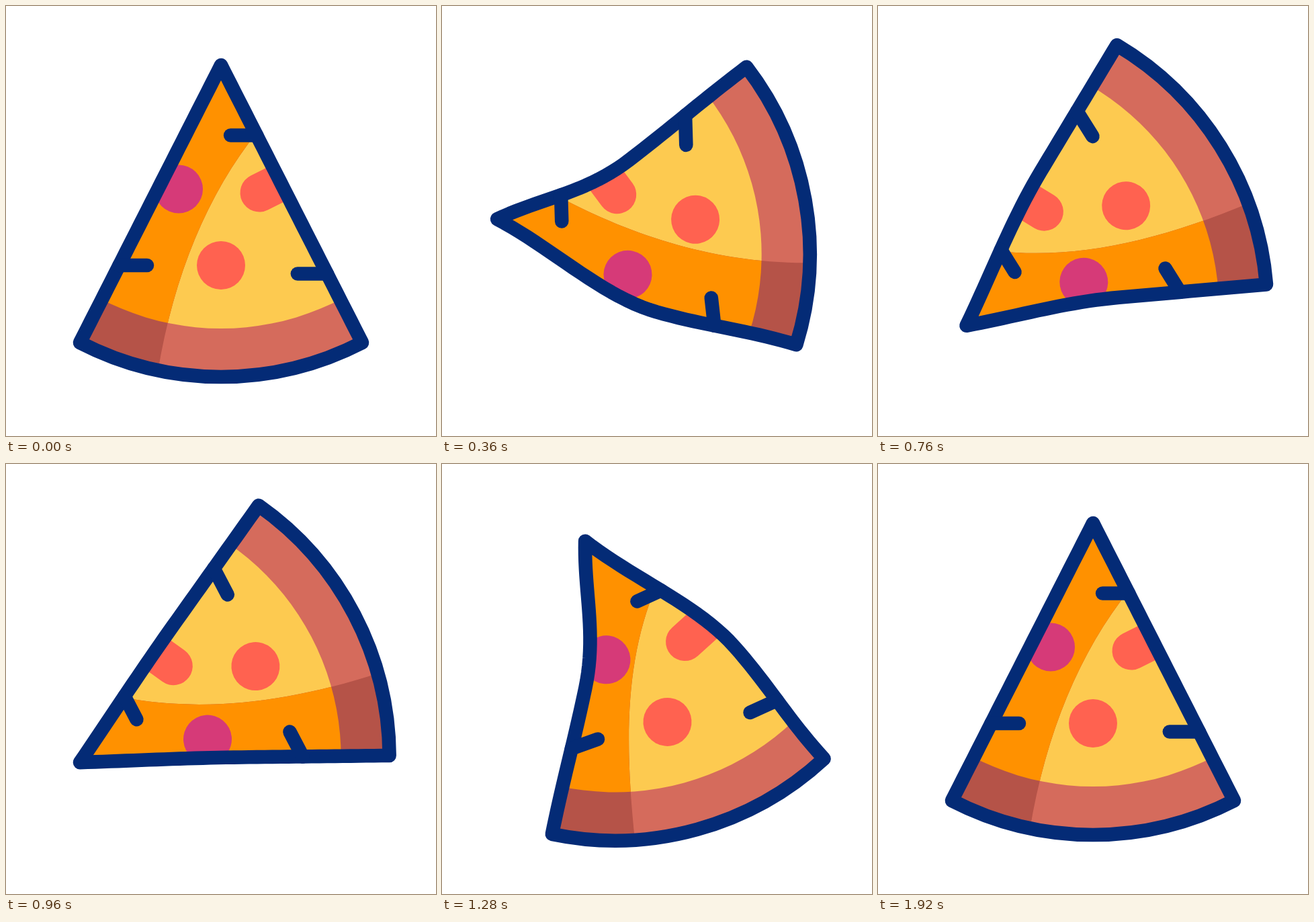
Write an HTML page with a canvas that moves like this. It is 640 by 640 pixels and loops after 2120 ms.

```html
<!DOCTYPE html>
<html>
<head>
<meta charset="utf-8">
<style>
  html, body { margin: 0; width: 100%; height: 100%; overflow: hidden; background: #fff; }
  canvas { display: block; width: 100vw; height: 100vh; }
</style>
</head>
<body>
<canvas id="stage" width="640" height="640"></canvas>
<script>
const ctx = document.getElementById('stage').getContext('2d');
const NAVY = '#042b76', LOOP = 2120, STEP = 40, RETURN = 900, SWING = 122;
const PIVOT = [320, 328], ARC = [320, 94], ARC_R = 458, CRUST_R = 386;
const SLOPE = 210 / 413;

// Smooth curve through [time, value] keys, flat at both ends
function track(keys, t) {
  const last = keys.length - 1;
  if (t <= keys[0][0]) return keys[0][1];
  if (t >= keys[last][0]) return keys[last][1];
  const i = keys.findIndex(k => k[0] > t) - 1;
  const slope = j => j <= 0 || j >= last ? 0
    : (keys[j + 1][1] - keys[j - 1][1]) / (keys[j + 1][0] - keys[j - 1][0]);
  const [t0, a] = keys[i], [t1, b] = keys[i + 1], w = t1 - t0, s = (t - t0) / w;
  const e = s * s * (3 - 2 * s);
  return a + (b - a) * e + w * s * (1 - s) * ((1 - s) * slope(i) - s * slope(i + 1));
}

const turnKeys = [[0, 0], [60, .036], [240, .393], [380, .873], [520, 1]];
const bulgeKeys = [[240, 0], [380, 1], [520, 0]];
const tipKeys = end => [[0, 0], [60, 5.6], [240, 68], [380, 46], [560, -42], [700, -38], [end, 0]];

function pose(t) {
  const dir = t < RETURN ? 1 : -1;
  const u = dir > 0 ? t : t - RETURN;
  const turn = track(turnKeys, u);
  return {
    dir,
    angle: -SWING * (dir > 0 ? turn : 1 - turn) * Math.PI / 180,
    tip: dir * track(tipKeys(dir > 0 ? 890 : 1010), u),
    bulge: track(bulgeKeys, u)
  };
}

// Point on a flank: the tip lags behind, the middle bulges
function edge(p, side, y) {
  const h = Math.max(0, (304 - y) / 216), g = h * h * (2 - h);
  const b = p.bulge * Math.sin(Math.PI * (501 - y) / 413) ** 2;
  return [
    320 + side * (y - 88) * SLOPE + p.tip * g - p.dir * b * (11 - 5 * p.dir * side),
    y + .0028 * p.tip * p.tip * g
  ];
}

function outline(p) {
  const path = new Path2D(), n = 40;
  for (let i = 0; i <= n; i++) path.lineTo(...edge(p, -1, 501 - 413 * i / n));
  for (let i = 1; i <= n; i++) path.lineTo(...edge(p, 1, 88 + 413 * i / n));
  const a = Math.atan2(407, 210);
  path.arc(...ARC, ARC_R, a, Math.PI - a);
  path.closePath();
  return path;
}

// Dark left part; the upper end of its border follows the tip
function shade(p) {
  const path = new Path2D(), shift = .36 * p.tip;
  path.moveTo(0, 0);
  path.lineTo(460, 60);
  path.lineTo(375 + shift, 186);
  path.bezierCurveTo(300 + shift, 280, 250, 400, 226, 545);
  path.lineTo(222, 640);
  path.lineTo(0, 640);
  path.closePath();
  return path;
}

function layer(crust, cheese) {
  ctx.fillStyle = crust;
  ctx.fillRect(-100, -100, 840, 840);
  ctx.fillStyle = cheese;
  ctx.beginPath();
  ctx.rect(-100, -100, 840, 400);
  ctx.arc(...ARC, CRUST_R, 0, 2 * Math.PI);
  ctx.fill();
}

function dot(x, y, color) {
  ctx.fillStyle = color;
  ctx.beginPath();
  ctx.arc(x, y, 36, 0, 2 * Math.PI);
  ctx.fill();
}

function line(x0, y0, x1, y1, color, width) {
  ctx.strokeStyle = color;
  ctx.lineWidth = width;
  ctx.beginPath();
  ctx.moveTo(x0, y0);
  ctx.lineTo(x1, y1);
  ctx.stroke();
}

function tick(p, side, y, length) {
  const [x, ey] = edge(p, side, y);
  const a = p.dir * p.bulge * (side > 0 ? .157 : .07);
  line(x, ey, x - side * length * Math.cos(a), ey - side * length * Math.sin(a), NAVY, 20.6);
}

function draw(t) {
  const p = pose(t), body = outline(p);
  ctx.fillStyle = '#fff';
  ctx.fillRect(0, 0, 640, 640);
  ctx.lineCap = ctx.lineJoin = 'round';
  ctx.save();
  ctx.translate(...PIVOT);
  ctx.rotate(p.angle);
  ctx.translate(-PIVOT[0], -PIVOT[1]);

  ctx.save();
  ctx.clip(body);
  layer('#d56b5c', '#fdca50');
  ctx.save();
  ctx.clip(shade(p));
  layer('#b55348', '#ff9100');
  ctx.restore();
  dot(320, 386, '#ff6250');
  dot(257, 272.5, '#d63a78');
  line(377, 278, 457, 238, '#ff6250', 57);
  ctx.restore();

  ctx.strokeStyle = NAVY;
  ctx.lineWidth = 20.6;
  ctx.stroke(body);
  tick(p, 1, 192.5, 39);
  tick(p, 1, 398.5, 44);
  tick(p, -1, 386, 41.5);
  ctx.restore();
}

const start = performance.now();
function frame() {
  const t = (performance.now() - start) % LOOP;
  draw(Math.floor(t / STEP) * STEP);
  requestAnimationFrame(frame);
}
frame();
</script>
</body>
</html>
```
